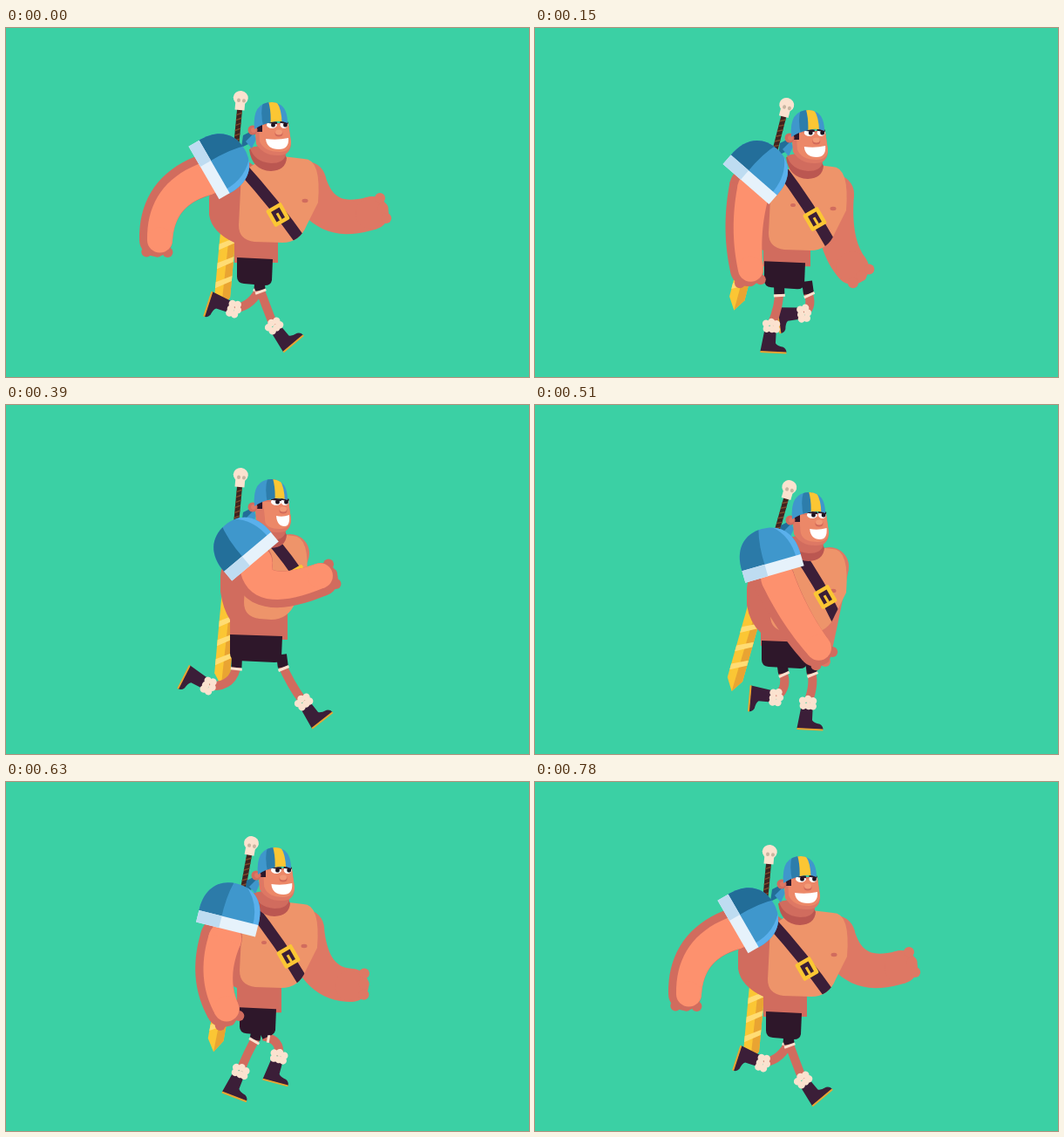
Write an HTML page with a canvas that moves like this. It is 600 px wide and 400 px high and loops after 810 ms.

```html
<!DOCTYPE html>
<html lang="en">
<head>
<meta charset="utf-8">
<title>Running warrior</title>
<style>
html, body { margin: 0; width: 100%; height: 100%; overflow: hidden; background: #3bd0a4; }
canvas { display: block; width: 600px; height: 400px; }
</style>
</head>
<body>
<canvas id="stage" width="600" height="400"></canvas>
<script>
const ctx = document.getElementById('stage').getContext('2d');
const LOOP = 810, CYCLE = 780, STEP = 30;
const C = {
  bg: '#3bd0a4', skin: '#ee946a', lit: '#fd916e', shade: '#d16c5e', far: '#de7864', neck: '#bb5751',
  dark: '#2e172a', boot: '#3b1e38', cream: '#fbe2cf', gold: '#fbc634', amber: '#e9a432',
  blue: '#3f97cc', deep: '#226d98', sky: '#5ab0ec'
};

// Periodic cubic interpolation through rows of values.
function track(period, times, rows) {
  const n = times.length;
  const at = i => times[(i + n) % n] + Math.floor(i / n) * period;
  const row = i => rows[(i + n) % n];
  return t => {
    t %= period;
    let i = n - 1;
    while (times[i] > t) i--;
    const t0 = at(i), t1 = at(i + 1), h = t1 - t0, u = (t - t0) / h;
    return row(i).map((a, k) => {
      const b = row(i + 1)[k];
      const m0 = (b - row(i - 1)[k]) / (t1 - at(i - 1)) * h;
      const m1 = (row(i + 2)[k] - a) / (at(i + 2) - t0) * h;
      return a + u * m0 + u * u * (3 * (b - a) - 2 * m0 - m1) + u * u * u * (2 * (a - b) + m0 + m1);
    });
  };
}

// head x, head y, pommel x, pommel y, sword angle: two bounces per cycle
const body = track(390, [0, 120, 150, 240, 270], [
  [304, 85, 269, 83, 5.3], [314, 100, 291, 97, 15.8], [313, 94, 288, 91, 14.4],
  [308, 75, 281, 73, 10.3], [306, 73, 278, 71, 9.4]
]);

const KEYS = [0, 150, 270, 390, 510, 630];
const pose = rows => track(CYCLE, KEYS, rows);

// Same, but every odd value is a height that rides on the bounce.
function riding(rows) {
  const bounce = (row, t, s) => row.map((v, k) => k % 2 ? v + s * body(t)[1] : v);
  const f = pose(rows.map((r, i) => bounce(r, KEYS[i], -1)));
  return t => bounce(f(t), t, 1);
}

// shoulder, bend, hand
const nearArm = riding([
  [230, 168, 173, 186, 172, 243], [247, 182, 235, 230, 243, 277], [268, 170, 249, 233, 337, 223],
  [282, 180, 282, 230, 362, 200], [274, 200, 293, 245, 322, 281], [247, 178, 230, 224, 249, 262]
]);
const farArm = riding([
  [345, 175, 362, 230, 420, 212], [344, 190, 341, 248, 364, 275], [332, 160, 318, 200, 308, 228],
  [326, 170, 310, 205, 270, 215], [338, 185, 330, 235, 322, 278], [343, 168, 350, 232, 397, 233]
]);
// rim centre, angle
const padPose = riding([
  [227, 166, 60], [242, 179, 41], [264, 172, 0], [286, 179, -40], [275, 194, -16], [252, 169, 14]
]);
// top, bottom, buckle
const beltPose = riding([
  [272, 163, 338, 243, 312, 214], [285, 165, 338, 246, 321, 219], [300, 148, 340, 206, 330, 193],
  [304, 155, 342, 205, 336, 197], [305, 173, 344, 242, 333, 220], [285, 148, 339, 226, 324, 200]
]);
// chest left, chest right, back, waist left, waist right, head turn
const torsoPose = pose([
  [267, 359, 233, 262, 312, 0], [268, 358, 232, 262, 316, .15], [270, 352, 243, 258, 319, .8],
  [273, 346, 246, 257, 323, 1], [270, 358, 243, 259, 315, .6], [268, 358, 234, 265, 316, .2]
]);
// shorts left, shorts right
const shortsPose = pose([[265, 306], [263, 310], [260, 314], [257, 317], [260, 313], [268, 310]]);
// hip x, knee, ankle, boot angle
const nearLeg = pose([
  [290, 298, 318, 307, 341, -40], [280, 281, 318, 271, 341, 3], [266, 262, 312, 242, 328, 40],
  [265, 262, 324, 233, 322, 117], [283, 292, 322, 277, 335, 95], [295, 316, 295, 313, 314, 15]
]);
const farLeg = pose([
  [292, 284, 318, 262, 322, 108], [312, 320, 318, 309, 327, 82], [315, 337, 298, 337, 318, 2],
  [316, 326, 320, 341, 340, -38], [316, 322, 318, 313, 341, 3], [288, 276, 312, 269, 331, 21]
]);

const fill = (path, color) => {
  ctx.fillStyle = color;
  ctx.fill(typeof path === 'string' ? new Path2D(path) : path);
};
const stroke = (d, color, width, cap = 'butt') => {
  ctx.strokeStyle = color;
  ctx.lineWidth = width;
  ctx.lineCap = cap;
  ctx.stroke(new Path2D(d));
};
const oval = (x, y, rx, ry, color) => {
  const p = new Path2D();
  p.ellipse(x, y, rx, ry, 0, 0, 7);
  fill(p, color);
};
const box = (x, y, w, h, color) => {
  ctx.fillStyle = color;
  ctx.fillRect(x, y, w, h);
};
function place(x, y, deg, draw) {
  ctx.save();
  ctx.translate(x, y);
  ctx.rotate(deg * Math.PI / 180);
  draw();
  ctx.restore();
}

// Tapered curved limb; shift moves it sideways.
function limb([ax, ay, bx, by, cx, cy], r0, r1, color, shift = 0) {
  ctx.beginPath();
  const left = [], right = [];
  let end;
  for (let i = 0; i <= 18; i++) {
    const u = i / 18, v = 1 - u;
    const dx = v * (bx - ax) + u * (cx - bx), dy = v * (by - ay) + u * (cy - by);
    const l = Math.hypot(dx, dy) || 1, nx = -dy / l, ny = dx / l;
    const x = v * v * ax + 2 * v * u * bx + u * u * cx + nx * shift;
    const y = v * v * ay + 2 * v * u * by + u * u * cy + ny * shift;
    const r = r0 + (r1 - r0) * u;
    left.push([x + nx * r, y + ny * r]);
    right.unshift([x - nx * r, y - ny * r]);
    if (!i) oval(x, y, r0, r0, color);
    end = [x, y, nx, ny];
  }
  ctx.beginPath();
  left.concat(right).forEach(p => ctx.lineTo(...p));
  ctx.fillStyle = color;
  ctx.fill();
  const [x, y, nx, ny] = end;
  oval(x, y, r1, r1, color);
  return { x, y, nx, ny };
}

function knuckles({ x, y, nx, ny }, r, color) {
  for (const k of [-.72, -.1, .55]) {
    const s = r * k, f = r * .72;
    oval(x + nx * s + ny * f, y + ny * s - nx * f, 6, 6, color);
  }
}

function sword(x, y, deg) {
  place(x, y, deg, () => {
    box(-3, 8, 6, 52, '#42231f');
    for (let k = 14; k < 58; k += 6) stroke(`M-3 ${k + 3}L3 ${k}`, '#7b4a2c', 1.5);
    fill('M-9 110H9V226L0 240L-9 226Z', C.gold);
    fill('M2 110H9V226L0 240Z', C.amber);
    for (let k = 160; k < 225; k += 22) fill(`M-9 ${k + 6}L9 ${k - 3}V${k + 3}L-9 ${k + 13}Z`, '#ffdc74');
    oval(0, -3, 8.5, 8, C.cream);
    box(-5.5, 1, 11, 10, C.cream);
    oval(-2, 0, 2, 2.2, '#c9b5a0');
    oval(4, 0, 2, 2.2, '#c9b5a0');
  });
}

function leg([hx, kx, ky, ax, ay, deg], hy) {
  const l = Math.hypot(kx - hx, ky - hy) || 1, ux = (kx - hx) / l, uy = (ky - hy) / l;
  stroke(`M${hx} ${hy}Q${kx} ${ky} ${ax} ${ay}`, C.shade, 10);
  stroke(`M${hx} ${hy - 10}L${hx + ux * 5} ${hy + uy * 5}`, C.dark, 12);
  stroke(`M${hx + ux * 5} ${hy + uy * 5}l${ux * 3} ${uy * 3}`, C.cream, 13);
  place(ax, ay, deg, () => {
    fill('M-7 3H6V20Q8 23 15 24Q19 26 19 30H-11Z', C.boot);
    fill('M-11 29.5H19V31.5H-11Z', C.amber);
    for (const [x, y] of [[-6, -2], [0, -4], [6, -2], [-5, 4], [1, 4], [6, 4]]) oval(x, y, 4.2, 4.2, C.cream);
  });
}

function torso(t, [L, R, back, wl, wr], top, waist) {
  const bottom = top + 96;
  fill(`M${L + 12} ${top + 4}C${back + 14} ${top + 8} ${back} ${top + 30} ${back} ${top + 48}
    V${bottom - 32}Q${back + 3} ${bottom - 12} ${wl} ${bottom}V${waist + 4}H${wr}V${bottom - 12}L${R - 12} ${top + 50}Z`, C.shade);
  const chest = new Path2D(`M${L + 3} ${top + 16}L${L} ${bottom - 20}Q${L} ${bottom - 3} ${L + 18} ${bottom - 1}
    L${R - 42} ${bottom}Q${R - 22} ${bottom} ${R - 14} ${bottom - 20}L${R - 1} ${top + 50}
    Q${R + 3} ${top} ${R - 17} ${top}L${R - 42} ${top - 3}L${L + 24} ${top + 2}Z`);
  fill(chest, C.skin);
  oval(L + 28, top + 44, 3, 2, C.shade);
  oval(R - 16, top + 48, 3.5, 2.2, C.shade);

  const [ax, ay, bx, by, cx, cy] = beltPose(t);
  ctx.save();
  ctx.clip(chest);
  stroke(`M${ax - 6} ${ay - 8}Q${(ax + bx) / 2 + 3} ${(ay + by) / 2 - 2} ${bx + 3} ${by + 5}`, C.boot, 13);
  ctx.restore();
  place(cx, cy, -30, () => {
    fill('M-8 -11H8Q10 -11 10 -9V9Q10 11 8 11H-8Q-10 11 -10 9V-9Q-10 -11 -8 -11Z', C.gold);
    box(-5.5, -6.5, 11, 13, C.boot);
    box(-1.5, -2, 3, 9, C.gold);
  });
}

function shorts([l, r], y) {
  fill(`M${l} ${y - 2}L${r} ${y}L${r - 1} ${y + 24}Q${r - 2} ${y + 30} ${r - 9} ${y + 30}
    L${l + 8} ${y + 28}Q${l} ${y + 27} ${l} ${y + 20}Z`, C.dark);
}

function head(x, y, q) {
  place(x, y, 0, () => {
    fill('M-25 54Q-22 78 0 79Q17 78 18 64L12 52Z', C.neck);
    fill('M-24 52Q-20 68 0 70Q15 70 17 60L8 46Z', C.shade);
    fill('M-22 33L-32 38L-34 52L-24 47L-18 36Z', C.deep);
    fill('M-20 36L-29 45L-22 53L-17 42Z', C.blue);
    fill('M-19 24H20L23 46Q23 61 9 61Q-8 62 -17 48Z', C.far);
    fill(`M${-14 + 5 * q} 26H20L23 46Q22 57 10 57Q-8 57 ${-13 + 6 * q} 45Z`, '#ec8868');
    fill('M-19 27L-10 24V34H-17Z', C.dark);
    oval(-21, 32, 5.5, 5.5, C.shade);
    oval(-20, 32, 3, 3, C.far);

    const eye = (ex, w) => {
      oval(ex, 26, w, 4, '#fff');
      oval(ex + 1.5, 26, 2.4, 2.6, '#1d1320');
      stroke(`M${ex - w} 22.5L${ex + w} 24`, '#2c1726', 2.5);
    };
    eye(1 + 5 * q, 6);
    eye(15 + q, 4.5);
    oval(9 + 5 * q, 36, 4.5, 3.5, '#d26a5a');
    oval(9 + 5 * q, 34.5, 4, 3, '#f29a77');

    const ml = -6 + 12 * q, mr = 20 + q;
    fill(`M${ml} 42Q${(ml + mr) / 2} 44 ${mr} 41Q${mr + 1} 54 ${(ml + mr) / 2 + 2} 54Q${ml + 1} 54 ${ml} 42Z`, '#fff');

    const cap = new Path2D('M-19 31Q-22 0 1 0Q19 1 19 24Q10 20 0 23Q-10 25 -19 31Z');
    ctx.save();
    fill(cap, C.blue);
    ctx.clip(cap);
    const s = 5 * q;
    fill(`M${-9 + s} 0Q${-13 + s} 12 ${-8 + s} 32H${1 + s}V0Z`, '#2d7dab');
    fill(`M${-3 + s} -1Q${1 + s} 12 ${-1 + s} 32H${12 + s * .7}Q${14 + s * .6} 10 ${6 + s * .6} -1Z`, C.gold);
    ctx.restore();
  });
}

function pad([x, y, deg]) {
  place(x, y, deg, () => {
    const dome = new Path2D('M-35 -13C-36 -39 -22 -54 0 -54C22 -54 36 -39 35 -13Z');
    fill(dome, C.blue);
    ctx.save();
    ctx.clip(dome);
    fill('M40 -60V-10H29Q30 -40 8 -56Z', C.sky);
    ctx.globalAlpha = .5 + .5 * Math.min(1, Math.abs(deg) / 45);
    fill('M-40 -60H-2Q-9 -40 -8 -10H-40Z', C.deep);
    ctx.restore();
    box(-35, -14, 70, 14, '#e6f2fb');
    box(-35, -14, 27, 14, '#bedcf1');
  });
}

function draw(t) {
  box(0, 0, 600, 400, C.bg);
  const [hx, hy, px, py, tilt] = body(t);
  const shape = torsoPose(t), waist = 265 + (hy - 85) * .47;

  knuckles(limb(farArm(t), 22, 19, C.far), 19, C.far);
  sword(px, py, tilt);
  leg(farLeg(t), waist + 31);
  leg(nearLeg(t), waist + 31);
  torso(t, shape, hy + 65, waist);
  shorts(shortsPose(t), waist);
  head(hx, hy, shape[5]);

  const arm = nearArm(t);
  knuckles(limb(arm, 24, 19, C.shade), 19, C.shade);
  limb(arm, 19, 14.5, C.lit, -4.5);
  pad(padPose(t));
}

const start = performance.now();
function tick() {
  const t = (performance.now() - start) % LOOP;
  draw(Math.floor(t / STEP) * STEP % CYCLE);
  requestAnimationFrame(tick);
}
tick();
</script>
</body>
</html>
```
